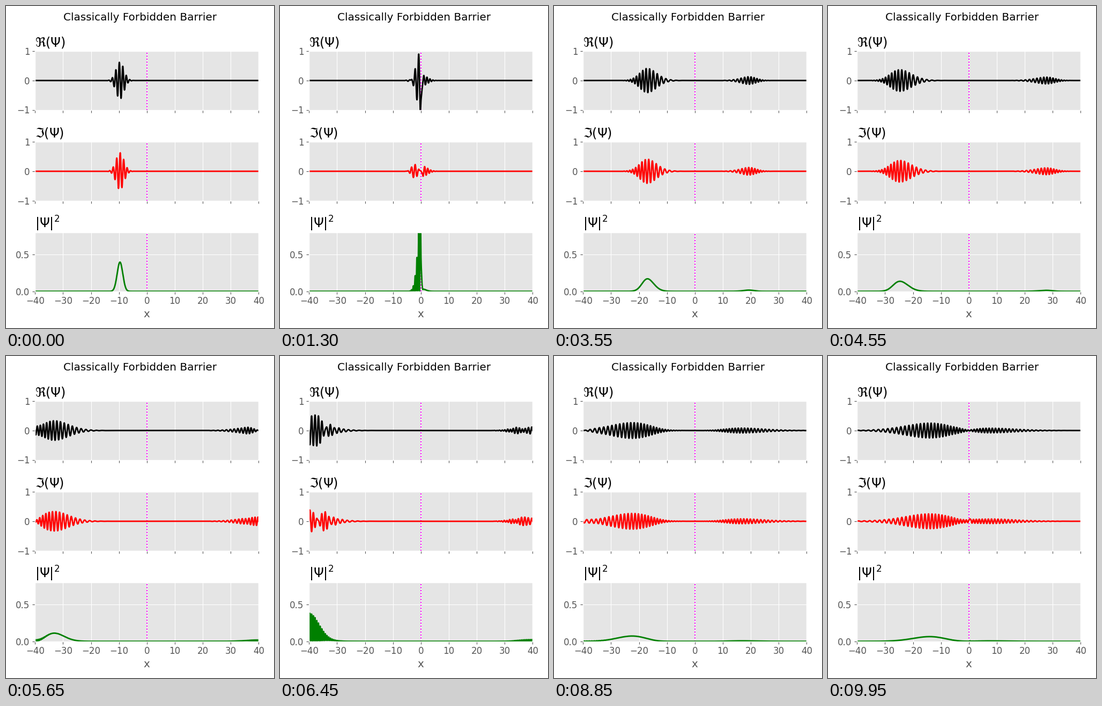
Write a matplotlib script that moves like this. It is 500 by 600 pixels and loops after 10 s.

```python
import matplotlib.pyplot as plt
import numpy as np
from matplotlib.animation import FuncAnimation

W, H, DPI = 500, 600, 100
FRAMES, INTERVAL = 200, 50

# Lattice, wave packet and barrier (hbar = m = 1)
HALF, CELLS = 40, 500
DX = 2 * HALF / CELLS
DT = 0.085
X0, K0 = -10, 5
V0, WIDTH = 14.5, 0.8
FINE = 1500


def evolve():
    """Return a fine grid and the wave function on it, one column per frame."""
    j = np.arange(1, CELLS)
    x = -HALF + j * DX
    barrier = np.where((x > -DX / 2) & (x < WIDTH - DX / 2), V0, 0.0)
    hop = np.full(CELLS - 2, -0.5 / DX**2)
    ham = np.diag(1 / DX**2 + barrier) + np.diag(hop, 1) + np.diag(hop, -1)
    energy, modes = np.linalg.eigh(ham)

    start = (2 * np.pi) ** -0.25 * np.exp(-(x - X0) ** 2 / 4 + 1j * K0 * x)
    steps = np.arange(1, FRAMES + 1)
    phases = np.exp(-1j * DT * np.outer(energy, steps))
    psi = modes @ ((modes.T @ start)[:, None] * phases)

    # Smooth interpolation through the sine series between the hard walls
    s = np.linspace(0, 1, FINE + 1)
    coarse = np.sin(np.pi * np.outer(j, j) / CELLS)
    fine = np.sin(np.pi * np.outer(s, j))
    return -HALF + 2 * HALF * s, fine @ (coarse @ psi) * (2 / CELLS)


def add_panel(fig, row, title, color, ylim, yticks):
    left, right, top, height, pitch = 54.2, 471.4, 84.2, 109.3, 169.1
    bottom = H - (top + row * pitch + height)
    ax = fig.add_axes([left / W, bottom / H, (right - left) / W, height / H])
    ax.set_xlim(-HALF, HALF)
    ax.set_ylim(*ylim)
    ax.set_xticks(range(-HALF, HALF + 1, 10))
    ax.set_yticks(yticks)
    ax.tick_params(labelbottom=row == 2)
    ax.set_title(title, loc="left")
    ax.axvline(0, color="magenta", ls=":", lw=1.5)
    line, = ax.plot([], [], color=color, lw=2)
    return ax, line


plt.style.use("ggplot")
plt.rcParams.update({"font.size": 12, "font.family": "DejaVu Sans",
                     "figure.facecolor": "white"})

x, psi = evolve()
curves = (psi.real, psi.imag, np.abs(psi) ** 2)

fig = plt.figure(figsize=(W / DPI, H / DPI), dpi=DPI)
fig.suptitle("Classically Forbidden Barrier", fontsize=14.4)
panels = [
    add_panel(fig, 0, r"$\Re(\Psi)$", "black", (-1, 1), [-1, 0, 1]),
    add_panel(fig, 1, r"$\Im(\Psi)$", "red", (-1, 1), [-1, 0, 1]),
    add_panel(fig, 2, r"$|\Psi|^2$", "green", (0, 0.8), [0, 0.5]),
]
panels[2][0].set_xlabel("x")
lines = [line for _, line in panels]


def update(frame):
    for line, curve in zip(lines, curves):
        line.set_data(x, curve[:, frame])
    return lines


anim = FuncAnimation(fig, update, frames=FRAMES, interval=INTERVAL,
                     repeat=True, repeat_delay=0)
plt.show()
```
